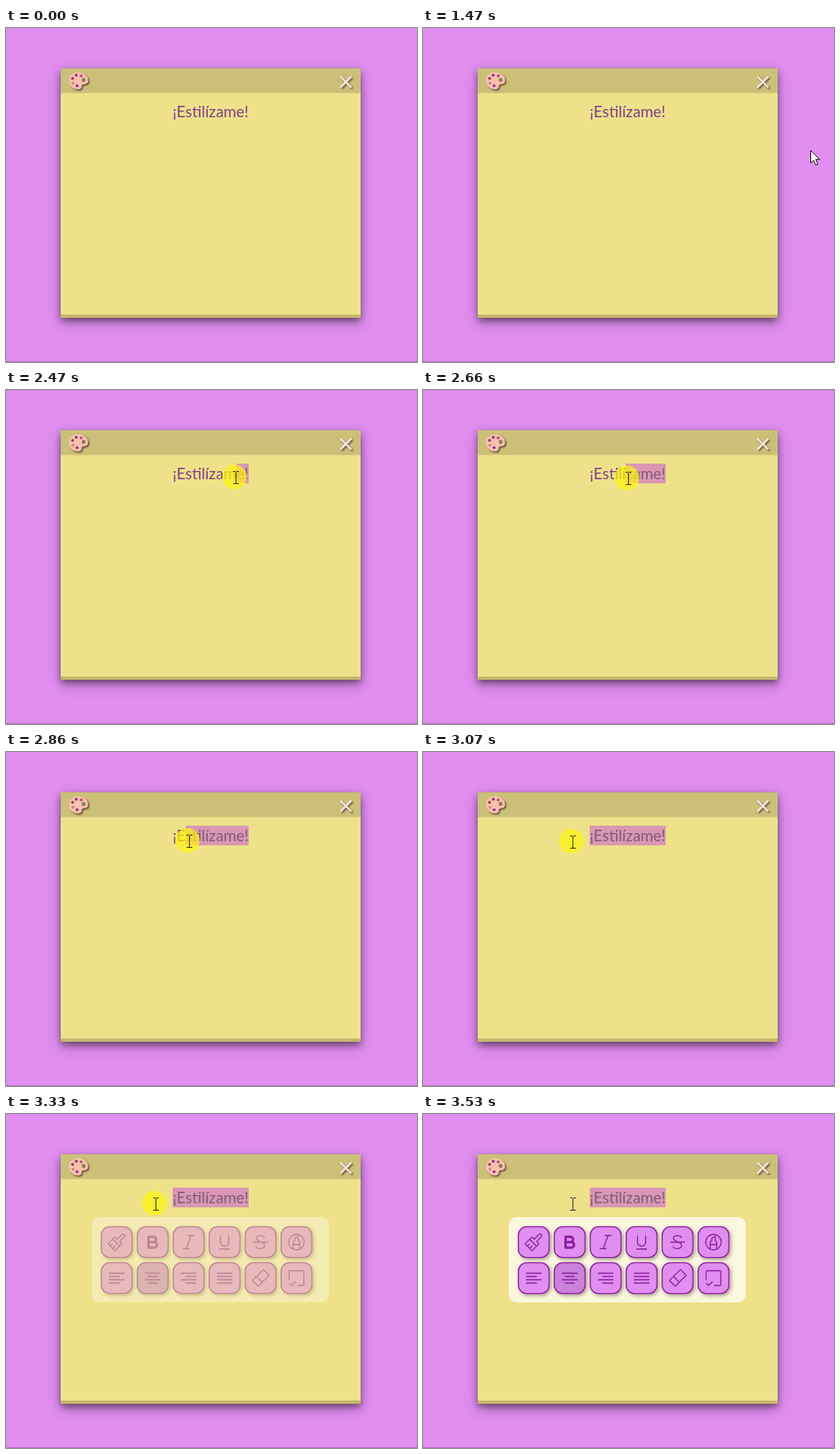
An HTML page with a canvas that plays this animation: 503x408 px, repeating every 5.73 s.

```html
<!DOCTYPE html>
<html lang="es">
<head>
<meta charset="utf-8">
<title>Nota</title>
<style>
html, body { margin: 0; width: 100%; height: 100%; overflow: hidden; background: #e08ef0; }
canvas { display: block; width: 503px; height: 408px; }
</style>
</head>
<body>
<canvas id="stage" width="503" height="408"></canvas>
<script>
const W = 503, H = 408, LOOP = 5730;
const LABEL = '¡Estilízame!', LEFT = 204, RIGHT = 297, BASE = 109;
const INK = '#8a1fa0', PINK = '#e08ef0';
const ctx = document.getElementById('stage').getContext('2d');

function layer(paint) {
  const c = document.createElement('canvas');
  c.width = W;
  c.height = H;
  paint(c.getContext('2d'));
  return c;
}

function shadow(g, x, y, blur, color) {
  g.shadowOffsetX = x;
  g.shadowOffsetY = y;
  g.shadowBlur = blur;
  g.shadowColor = color;
}

function box(g, x, y, w, h, r, fill) {
  g.beginPath();
  g.roundRect(x, y, w, h, r);
  g.fillStyle = fill;
  g.fill();
}

function disc(g, x, y, r, fill) {
  g.beginPath();
  g.arc(x, y, r, 0, 7);
  g.fillStyle = fill;
  g.fill();
}

function paintNote(g) {
  g.fillStyle = PINK;
  g.fillRect(0, 0, W, H);
  g.fillStyle = '#b176bd';
  g.fillRect(0, 407, W, 1);
  g.save();
  shadow(g, 0, 4, 8, 'rgba(0,0,0,.45)');
  box(g, 67, 49.5, 367, 304.5, 1, '#c6b76c');
  shadow(g, 0, 6, 20, 'rgba(0,0,0,.2)');
  box(g, 67, 49.5, 367, 304.5, 1, '#c6b76c');
  g.restore();
  g.fillStyle = '#efe18a';
  g.fillRect(67, 79, 367, 271);
  g.fillStyle = '#ccc078';
  g.fillRect(67, 49.5, 367, 30);

  // palette
  g.save();
  shadow(g, 1.5, 1.5, 2, 'rgba(70,40,40,.75)');
  g.fillStyle = '#f8c1ae';
  g.fill(new Path2D('M88 54C95 54 100.500 58.500 100.500 64C100.500 69 96 68.500 94 69C91.500 70 94.500 75 88 75C82 75 77 70.500 77 64.500C77 58.500 82 54 88 54Z'));
  g.restore();
  disc(g, 95, 63.5, 2.4, '#8f7a58');
  for (const [x, y, c] of [[81.5, 61.5, '#a03a5e'], [86, 57.8, '#8c2f7c'], [92, 58.5, '#b0506a'],
    [82, 67.5, '#c98a7a'], [87, 70.5, '#94307f']]) disc(g, x, y, 1.8, c);

  // close
  g.save();
  shadow(g, 1.5, 1.5, 2, 'rgba(70,40,40,.75)');
  g.strokeStyle = '#fde6e4';
  g.lineWidth = 2.4;
  g.lineCap = 'round';
  g.stroke(new Path2D('M410 60L422 72M422 60L410 72'));
  g.restore();
}

const lines = (...rows) => rows.map(([a, b], i) => `M${a} ${i * 4 - 6}H${b}`).join('');
const FULL = [-9.5, 9.5];
const ICONS = [
  { d: 'M-2 -3V-11A2 2 0 0 1 2 -11V-3H6V9H-6V-3ZM-6 1H6M-2 9V5M2 9V4', turn: true },
  { d: 'M-5 -6.500H1A3.250 3.250 0 0 1 1 0H-5ZM-5 0H2A3.400 3.400 0 0 1 2 6.800H-5Z', width: 3 },
  { d: 'M-1 -8H7M-7 8H1M3 -8L-3 8' },
  { d: 'M-5 -8V0A5 5 0 0 0 5 0V-8M-6.500 8.500H6.500' },
  { d: 'M5 -5C4 -9 -5 -9 -5 -4.500C-5 -1 5 0 5 4C5 9 -5 9 -5.500 5M-9 0H9' },
  { d: 'M-9.500 0A9.500 9.500 0 1 1 9.500 0A9.500 9.500 0 1 1 -9.500 0M-4 8V-.5L-2 -1.500V-5L2 -7V-1.500L4 -.5V8M-4 3H4' },
  { d: lines(FULL, [-9.5, 4], FULL, [-9.5, 4]) },
  { d: lines(FULL, [-6, 6], FULL, [-6, 6]) },
  { d: lines(FULL, [-4, 9.5], FULL, [-4, 9.5]) },
  { d: lines(FULL, FULL, FULL, FULL) },
  { d: 'M-4 -10H4Q5 -10 5 -9V8Q5 9 4 9H-4Q-5 9 -5 8V-9Q-5 -10 -4 -10ZM-5 2H5', turn: true },
  { d: 'M-9 2V-8Q-9 -9 -8 -9H8Q9 -9 9 -8V8Q9 9 8 9H1M-9 6L-6 9L-1 4' }
];

function paintPanel(g) {
  box(g, 105, 126, 290, 104, 9, '#fbf7df');
  g.lineJoin = 'round';
  ICONS.forEach((icon, i) => {
    const x = 116 + i % 6 * 44, y = i < 6 ? 137 : 181;
    g.save();
    shadow(g, 2, 2, 4, 'rgba(90,70,60,.5)');
    box(g, x, y, 39, 39, 11, INK);
    g.restore();
    box(g, x + 1.3, y + 1.3, 36.4, 36.4, 9.8, i === 7 ? '#cb82da' : PINK);
    g.save();
    g.translate(x + 19.5, y + 19.5);
    if (icon.turn) g.rotate(Math.PI / 4);
    g.strokeStyle = INK;
    g.lineWidth = icon.width || 1.3;
    g.stroke(new Path2D(icon.d));
    g.restore();
  });
}

const note = layer(paintNote);
const panel = layer(paintPanel);

const setFont = px => { ctx.font = `400 ${px}px Quicksand, Lato, sans-serif`; };
setFont(20);
const size = 20 * (RIGHT - LEFT) / ctx.measureText(LABEL).width;
setFont(size);
const edges = [...LABEL].map((_, i) => LEFT + ctx.measureText(LABEL.slice(0, i)).width);
edges.push(RIGHT);

function label(color) {
  ctx.fillStyle = color;
  ctx.fillText(LABEL, LEFT, BASE);
}

const mix = (a, b, p) => a + (b - a) * p;

// Index of the current step among n spread evenly from a to b
const step = (t, a, b, n) => Math.min(n - 1, Math.floor((t - a) / (b - a) * (n - 1) + 1e-6));

function pointer(t) {
  if (t < 2270) {
    const u = t < 1470 ? 0 : step(t, 1470, 1930, 8) / 7;
    const p = (u + u * u * (3 - 2 * u)) / 2;
    return [mix(475, 316, p), mix(149, 106, p)];
  }
  if (t < 2860) {
    const p = 1 - (1 - (step(t, 2270, 2800, 8) + 1) / 8) ** 1.24;
    return [mix(316, 237, p), mix(106, 108.6, p)];
  }
  const p = (step(t, 2860, 3070, 4) + 1) / 4;
  return [mix(237, 183, p), mix(108.6, 110, p)];
}

function drawArrow(x, y) {
  ctx.save();
  ctx.translate(x - .5, y + .5);
  const shape = new Path2D('M0 0V15.500L3.600 12.200L6.200 18L8.700 17L6.200 11.200H11Z');
  ctx.fillStyle = '#fff';
  ctx.fill(shape);
  ctx.strokeStyle = '#111';
  ctx.lineWidth = 1;
  ctx.stroke(shape);
  ctx.restore();
}

function drawBeam(x, y) {
  x = Math.round(x);
  y = Math.round(y);
  ctx.fillStyle = '#3a3526';
  ctx.fillRect(x, y - 7, 1, 15);
  for (const row of [y - 8, y + 7]) {
    ctx.fillRect(x - 3, row, 3, 1);
    ctx.fillRect(x + 1, row, 3, 1);
  }
}

function drawSelection(x) {
  const from = edges.reduce((a, b) => Math.abs(b - x) < Math.abs(a - x) ? b : a);
  if (from >= RIGHT) return;
  ctx.save();
  ctx.beginPath();
  ctx.rect(Math.round(from), 90, RIGHT - Math.round(from), 24);
  ctx.clip();
  ctx.fillStyle = '#d997b3';
  ctx.fillRect(LEFT, 90, RIGHT - LEFT, 24);
  label('#7f5a7a');
  ctx.restore();
}

function draw(t) {
  const [x, y] = pointer(t);
  ctx.drawImage(note, 0, 0);
  label('#7d3f86');
  if (t >= 2270) drawSelection(x - 2);
  else if (t >= 2130) {
    ctx.fillStyle = '#4a4030';
    ctx.fillRect(RIGHT, 90, 1, 24);
  }
  if (t >= 3270) {
    const p = Math.min(1, (3270 + step(t, 3270, 3530, 5) * 65 - 3200) / 330);
    ctx.globalAlpha = 1 - (1 - p) ** 2.7;
    ctx.drawImage(panel, 0, 0);
    ctx.globalAlpha = 1;
  }
  if (t >= 2130 && t < 3400) disc(ctx, x - 1.5, y - 1, 15, 'rgba(252,244,14,.72)');
  if (t >= 1470) (x > 434 ? drawArrow : drawBeam)(x, y);
}

const start = performance.now();
function tick() {
  draw((performance.now() - start) % LOOP);
  requestAnimationFrame(tick);
}
tick();
</script>
</body>
</html>
```
